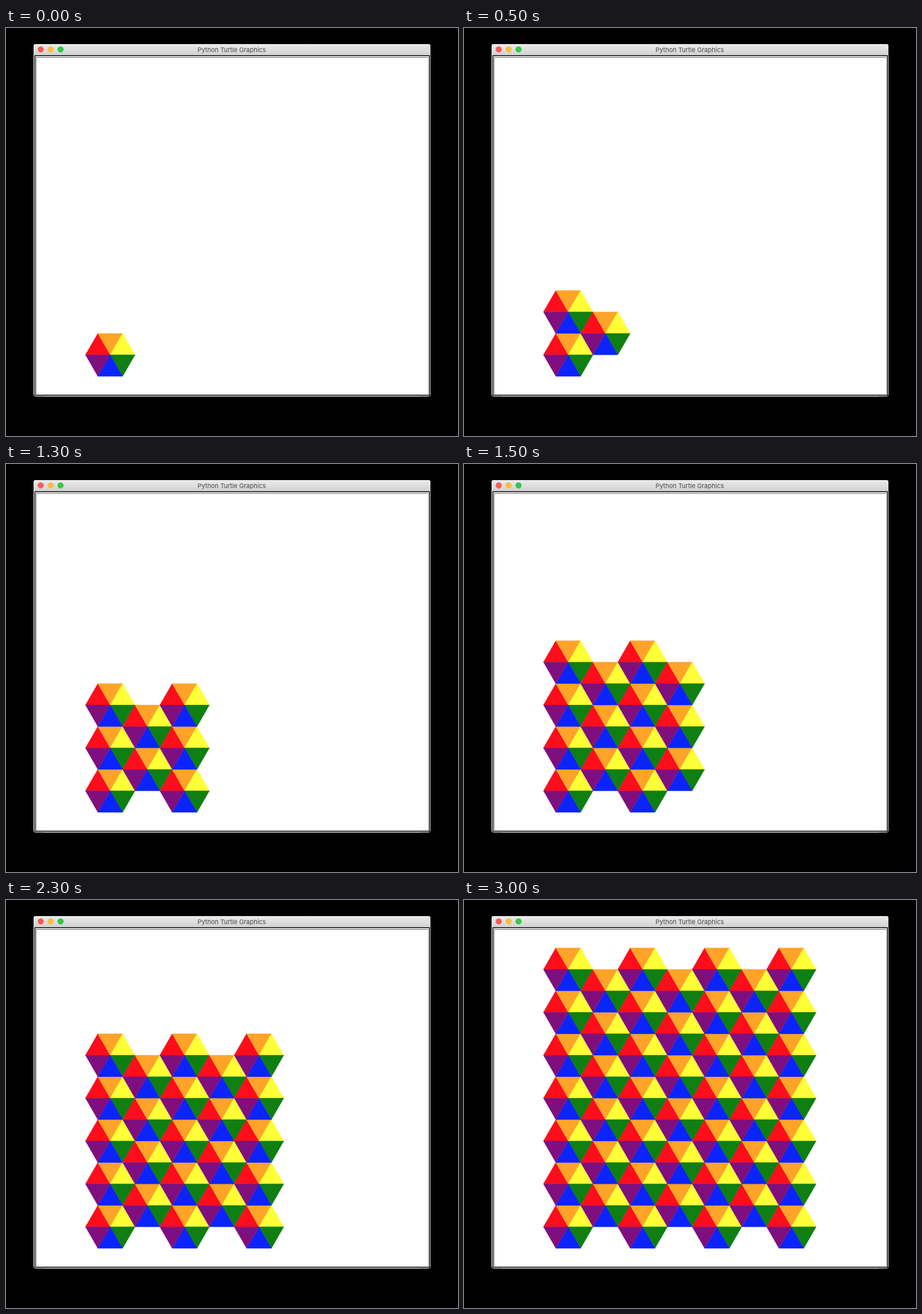
These frames come from a looping animation (787 px wide and 711 px high, 3500 ms). An HTML page:

```html
<!DOCTYPE html>
<html lang="en">
<head>
<meta charset="utf-8">
<title>Hexagon tiling</title>
<style>
html, body { margin: 0; width: 100%; height: 100%; overflow: hidden; background: #000; }
svg { display: block; }
text { font: 11px Inter, sans-serif; fill: #484848; text-anchor: middle; }
.ring { animation: 3500ms step-end infinite; }
@keyframes ring1 { 0% { opacity: 0 } 14.2857% { opacity: 1 } }
@keyframes ring2 { 0% { opacity: 0 } 28.5714% { opacity: 1 } }
@keyframes ring3 { 0% { opacity: 0 } 42.8571% { opacity: 1 } }
@keyframes ring4 { 0% { opacity: 0 } 57.1428% { opacity: 1 } }
@keyframes ring5 { 0% { opacity: 0 } 71.4285% { opacity: 1 } }
@keyframes ring6 { 0% { opacity: 0 } 85.7142% { opacity: 1 } }
</style>
</head>
<body>
<svg width="787" height="711" viewBox="0 0 787 711">
  <defs>
    <linearGradient id="bar" x2="0" y2="1">
      <stop stop-color="#ebebeb"/>
      <stop offset="1" stop-color="#d2d2d2"/>
    </linearGradient>
    <g id="hex" stroke-width=".5" stroke-linejoin="round"></g>
  </defs>
  <rect x="48" y="28" width="691" height="614" rx="4" fill="#fff"/>
  <path d="M48 47V32a4 4 0 0 1 4-4H735a4 4 0 0 1 4 4V47Z" fill="url(#bar)"/>
  <path d="M66 642.5H721" stroke="#555" stroke-width=".6"/>
  <rect x="50.25" y="48.25" width="687" height="591.75" fill="#fff" stroke="#000" stroke-width="1.6"/>
  <path d="M52.5 638.5V51.3H735" fill="none" stroke="#808080" stroke-width="1.2"/>
  <path d="M53 638H735V52" fill="none" stroke="#e2e2e2"/>
  <circle cx="60.5" cy="37.3" r="5.4" fill="#fc5b57"/>
  <circle cx="77.7" cy="37.3" r="5.4" fill="#fdbc40"/>
  <circle cx="95" cy="37.3" r="5.4" fill="#34c84a"/>
  <text x="393" y="41.5">Python Turtle Graphics</text>
  <g id="tiles"></g>
</svg>
<script>
const SIZE = 7, RADIUS = 43.17, ROW = RADIUS * Math.sqrt(3), COL = RADIUS * 1.5;
// Clockwise from the left corner.
const COLORS = ['#ff0d1b', '#ffa428', '#ffff38', '#0f7f12', '#0b24fb', '#7f0f7e'];

function add(parent, tag, attrs) {
  const el = document.createElementNS('http://www.w3.org/2000/svg', tag);
  for (const key in attrs) el.setAttribute(key, attrs[key]);
  return parent.appendChild(el);
}

function corner(i) {
  const a = Math.PI + i * Math.PI / 3;
  return (RADIUS * Math.cos(a)).toFixed(2) + ' ' + (RADIUS * Math.sin(a)).toFixed(2);
}

const hex = document.getElementById('hex');
COLORS.forEach((color, i) =>
  add(hex, 'path', { d: `M0 0L${corner(i)}L${corner(i + 1)}Z`, fill: color, stroke: color }));

const tiles = document.getElementById('tiles');
const rings = COLORS.concat('').map((_, k) =>
  add(tiles, 'g', k ? { class: 'ring', style: `animation-name: ring${k}` } : {}));

// A tile belongs to the smallest grid that contains it; odd columns hold one tile less.
for (let col = 0; col < SIZE; col++) {
  const odd = col % 2;
  for (let row = 0; row < SIZE - odd; row++) {
    add(rings[Math.max(col, row + odd)], 'use', {
      href: '#hex',
      x: 181.5 + col * COL,
      y: 569.6 - (row + odd / 2) * ROW
    });
  }
}
</script>
</body>
</html>
```
